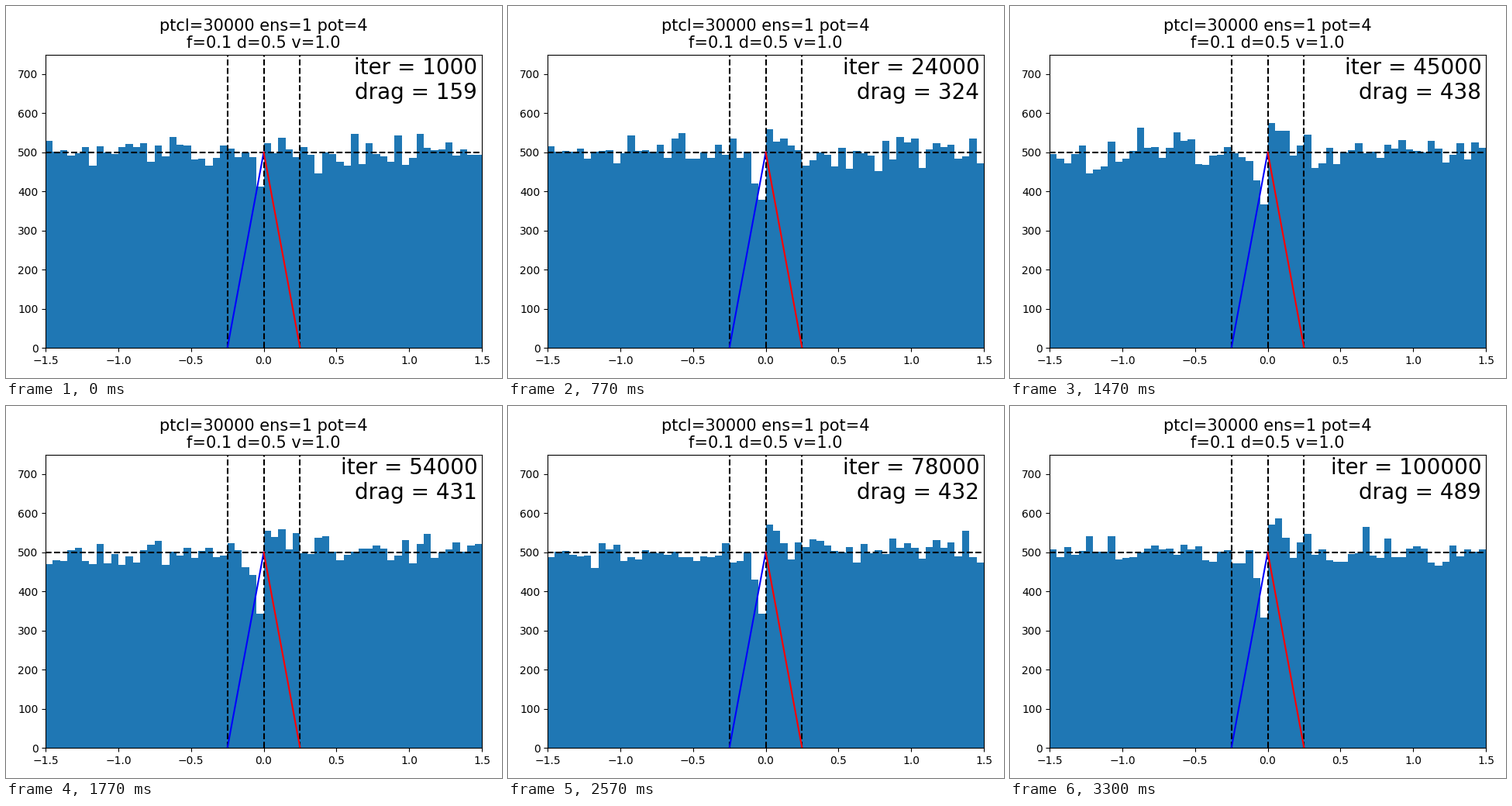
These frames come from a looping animation (640x480 px, 3330 ms). A matplotlib script:

```python
import matplotlib.pyplot as plt
import numpy as np
from matplotlib.animation import FuncAnimation

TICK_MS = 10
TICKS = 333
PARTICLES = 30000
BINS = 60
LEVEL = PARTICLES // BINS
HALF = 0.25  # half width of the potential
SPACING = 1.15

edges = np.linspace(-1.5, 1.5, BINS + 1)
centers = (edges[:-1] + edges[1:]) / 2
left = (centers > -HALF) & (centers < 0)
right = (centers > 0) & (centers < HALF)


def sample(step):
    """Return the histogram counts and the drag at one step."""
    dip = -220 * np.exp(centers / 0.0525)
    pile = 82 * np.exp(-(centers / 0.15) ** 2)
    buildup = 1 - np.exp(-(step + 1) / 1.5)
    expected = LEVEL + buildup * np.where(centers < 0, dip, pile)
    rng = np.random.default_rng(step)
    counts = rng.multinomial(PARTICLES, expected / expected.sum())
    return counts, counts[right].sum() - counts[left].sum()


plt.rcParams["font.family"] = "DejaVu Sans"
fig, ax = plt.subplots(figsize=(6.4, 4.8), dpi=100)
hist = ax.stairs(np.full(BINS, LEVEL), edges, fill=True, color="tab:blue")

for x in (-HALF, 0, HALF):
    ax.axvline(x, color="black", linestyle="--")
ax.axhline(LEVEL, color="black", linestyle="--")
ax.plot([-HALF, 0], [0, LEVEL], color="blue")
ax.plot([0, HALF], [LEVEL, 0], color="red")

label = ax.text(0.99, 0.99, "", fontsize=20, ha="right", va="top",
                linespacing=SPACING, transform=ax.transAxes)
ax.set_xlim(-1.5, 1.5)
ax.set_ylim(0, 750)
title = ax.set_title("ptcl=30000 ens=1 pot=4\nf=0.1 d=0.5 v=1.0", fontsize=15)
fig.tight_layout()
title.set_linespacing(SPACING)


def update(tick):
    # Three steps every ten ticks, lasting 30, 40 and 30 ms.
    step = (3 * tick + 1) // 10
    counts, drag = sample(step)
    hist.set_data(counts)
    label.set_text(f"iter = {(step + 1) * 1000}\ndrag = {drag}")
    return hist, label


anim = FuncAnimation(fig, update, frames=TICKS, interval=TICK_MS,
                     repeat=True, repeat_delay=0)
plt.show()
```
